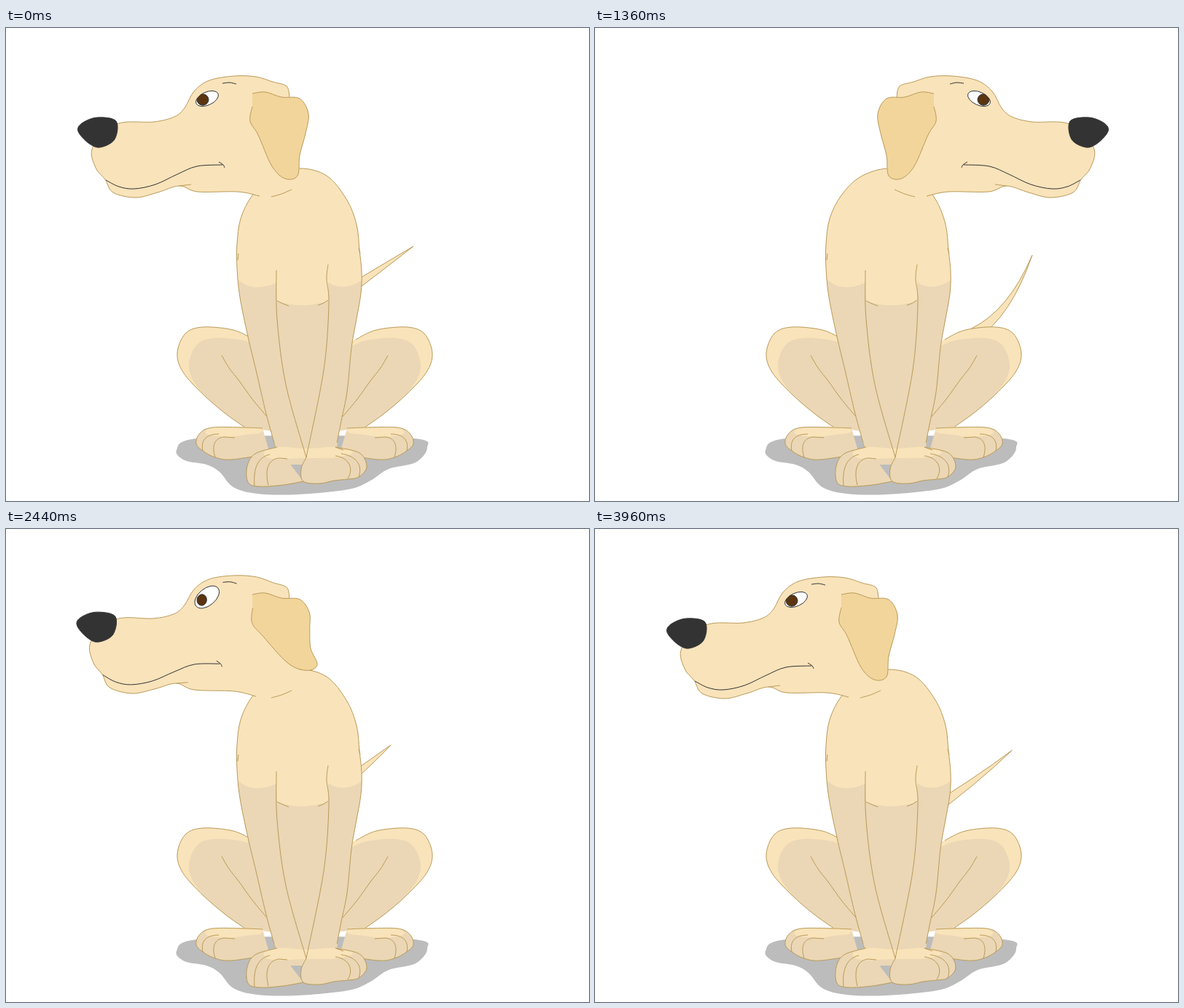
Animation, 800 px wide and 650 px high, one loop 4 s. Source, as an HTML page with a canvas:

```html
<!DOCTYPE html>
<html lang="en">
<head>
<meta charset="utf-8">
<title>Sitting dog</title>
<style>
html, body { margin: 0; width: 100%; height: 100%; overflow: hidden; background: #fff; }
canvas { display: block; }
</style>
</head>
<body>
<canvas id="stage" width="800" height="650"></canvas>
<script>
const ctx = document.getElementById('stage').getContext('2d');
const LIGHT = '#f9e3ba', SHADE = '#ebd7b5', EAR = '#f2d59b', LINE = '#b99a58', INK = '#333', SHADOW = '#bcbcbc';
const LOOP = 4000, STEP = 40, WAG = 800, FLIP = 170;

// Right-facing head: a few points per part, joined by smooth curves.
const awake = {
  head: [414,95, 418,80, 437,74, 460,67, 490,66, 524,72, 545,87, 558,110, 572,122, 600,129, 651,132,
    684,164, 680,192, 667,208, 656,226, 625,233, 595,226, 565,217, 540,225, 485,225, 455,231],
  nape: [400,196],
  nose: [652,128, 678,123, 699,131, 704,142, 690,158, 674,164, 654,153],
  ear: [465,90, 447,88, 425,95, 400,97, 388,118, 392,145, 400,175, 403,203, 420,207, 438,190, 457,147, 468,128, 465,108],
  mouth: [506,188, 541,190, 568,201, 598,215, 627,221, 648,218, 666,209],
  brow: [487,77, 496,75, 506,76],
  neck: [411,222, 425,228, 439,232],
  crease: [549,215, 565,217]
};
const asleep = {
  head: [416,113, 425,100, 428,87, 440,84, 490,83, 522,92, 541,107, 553,128, 562,142, 576,147, 650,155,
    689,180, 695,207, 682,233, 664,252, 635,260, 590,250, 545,238, 515,240, 490,244, 454,247],
  nape: [412,188],
  nose: [637,169, 662,159, 686,162, 687,177, 679,190, 658,191, 638,182],
  ear: [474,115, 448,116, 418,112, 404,123, 400,145, 407,174, 425,202, 452,221, 480,229, 504,221, 503,204, 478,180, 474,140],
  mouth: [506,211, 540,216, 575,231, 620,244, 648,236, 666,219, 683,214],
  brow: [481,113, 492,111, 506,112],
  neck: [410,220, 420,230, 436,238],
  crease: [532,237, 545,239]
};

const mix = (a, b, k) => a + (b - a) * k;
const ramp = (t, from, to) => Math.min(1, Math.max(0, (t - from) / (to - from)));
const wave = (t, peak) => Math.cos((t - peak) / WAG * 2 * Math.PI);

function mapPoints(points, fn) {
  const out = [];
  for (let i = 0; i < points.length; i += 2) out.push(...fn(points[i], points[i + 1]));
  return out;
}
function rotate(x, y, cx, cy, angle) {
  const c = Math.cos(angle), s = Math.sin(angle);
  return [cx + (x - cx) * c - (y - cy) * s, cy + (x - cx) * s + (y - cy) * c];
}

function spline(p, closed = false) {
  const n = p.length / 2;
  const at = i => {
    const j = 2 * (closed ? (i + n) % n : Math.min(n - 1, Math.max(0, i)));
    return [p[j], p[j + 1]];
  };
  const path = new Path2D();
  path.moveTo(p[0], p[1]);
  for (let i = 0; i < (closed ? n : n - 1); i++) {
    const [a, b, c, d] = [at(i - 1), at(i), at(i + 1), at(i + 2)];
    path.bezierCurveTo(b[0] + (c[0] - a[0]) / 6, b[1] + (c[1] - a[1]) / 6,
      c[0] - (d[0] - b[0]) / 6, c[1] - (d[1] - b[1]) / 6, ...c);
  }
  return path;
}
function fill(path, color) {
  ctx.fillStyle = color;
  ctx.fill(path);
}
function line(path, color = LINE) {
  ctx.strokeStyle = color;
  ctx.stroke(path);
}
function ellipse(...args) {
  const path = new Path2D();
  path.ellipse(...args);
  return path;
}
function scoped(draw) {
  ctx.save();
  draw();
  ctx.restore();
}
function mirrored(sum, draw) {
  scoped(() => {
    ctx.transform(-1, 0, 0, 1, sum, 0);
    draw();
  });
}

function drawShadow() {
  fill(spline([234,580, 245,594, 275,600, 293,610, 312,631, 345,640, 400,641, 470,634, 500,622, 525,606,
    562,597, 578,577, 560,564, 410,560, 262,564], true), SHADOW);
}

// The base leads the tip by about a quarter of the wag.
function drawTail(t) {
  const reach = wave(t, 600), bend = wave(t, 535), lead = wave(t, 460);
  const tip = [559 + (reach > 0 ? 43 : 100) * reach, 300 + (reach > 0 ? 13 : 10) * reach];
  const mid = [530 + 40 * bend, 347 + 45 * wave(t, 560)];
  const base = [485 + 50 * lead, 420 + 80 * Math.min(0, lead + .4)];
  const angle = Math.atan2(mid[1] - base[1], mid[0] - base[0]);
  const side = ([x, y], w) => [x - Math.sin(angle) * w, y + Math.cos(angle) * w];
  const path = new Path2D();
  path.moveTo(...side(base, -8));
  path.quadraticCurveTo(...side(mid, -4), ...tip);
  path.quadraticCurveTo(...side(mid, 4), ...side(base, 8));
  fill(path, LIGHT);
  line(path);
}

function drawHindLeg() {
  const thigh = spline([340,428, 312,415, 270,411, 246,420, 235,447, 243,473, 270,503, 300,529, 328,549]);
  const leg = new Path2D(thigh);
  leg.lineTo(375, 555);
  leg.lineTo(375, 440);
  fill(leg, LIGHT);
  scoped(() => {
    ctx.clip(leg);
    ctx.translate(16, 15);
    fill(leg, SHADE);
  });
  line(thigh);

  const foot = spline([352,550, 328,549, 283,549, 266,557, 261,571, 270,581, 287,590, 310,593, 362,585]);
  fill(foot, SHADE);
  fill(spline([285,549, 345,549, 350,556, 328,559, 305,562, 275,558], true), LIGHT);
  line(foot);
  line(new Path2D('M270 581C267 567 274 558 292 558M287 590C282 574 286 563 300 562L314 563'));
  line(spline([296,450, 306,467, 320,485, 338,510, 358,534]));
}

function drawBody() {
  const body = spline([370,577, 357,530, 343,470, 332,424, 321,370, 317,330, 317,297, 322,262, 338,230, 365,204,
    403,193, 440,203, 467,235, 481,270, 485,305, 488,335, 487,365, 480,405, 474,440, 468,500, 460,540, 453,576]);
  fill(body, LIGHT);
  scoped(() => {
    ctx.clip(body);
    fill(new Path2D('M310 335C325 360 350 360 371 350L372 375Q405 387 442 375L442 349C455 360 480 357 495 340V590H310Z'), SHADE);
  });
  line(body);

  const paws = [
    spline([372,576, 342,585, 331,602, 332,624, 347,630, 380,628, 408,623]),
    spline([412,590, 405,606, 408,623, 430,626, 450,622, 469,620, 484,617, 495,603, 485,584, 452,576])
  ];
  fill(new Path2D('M368 570H455L450 600H380Z'), SHADE);
  for (const paw of paws) fill(paw, SHADE);
  fill(spline([354,583, 374,576, 412,578, 452,576, 476,583, 455,590, 412,591, 365,592], true), LIGHT);
  for (const paw of paws) line(paw);
  line(new Path2D('M341 629C339 606 345 590 362 586M360 628C354 604 362 592 375 591L386 592' +
    'M469 619C478 605 470 590 452 588M484 617C490 600 480 588 460 585M452 576L463 580'));

  line(spline([371,333, 372,400, 384,490, 412,590]));
  line(spline([442,325, 440,345, 443,380, 436,470, 412,590]));
  line(new Path2D('M372 375Q380 379 388 382M428 381Q436 379 442 374M319 310L318 319M484 302L486 310'));
}

function drawEye({ lift, shut }, place) {
  const [x, y] = place(mix(527, 513, shut), mix(97, 135, shut));
  const width = mix(16.5, 22, lift), height = mix(9, 14, lift);
  if (shut > .9) {
    line(ellipse(x, y, 13 * place.squeeze, 4, .28, Math.PI, 2 * Math.PI), INK);
    return;
  }
  const eye = ellipse(x, y, width * place.squeeze, height * (1 - shut), mix(.42, .93, lift), 0, 2 * Math.PI);
  fill(eye, '#fff');
  scoped(() => {
    ctx.clip(eye);
    const iris = ellipse(x + mix(6, 8, lift) * place.squeeze, y + mix(1.5, 6, lift),
      mix(8, 5.5, lift), 7.7, -.25 * lift, 0, 2 * Math.PI);
    fill(iris, '#5b3511');
    line(iris, INK);
  });
  line(eye, INK);
}

function drawHead(pose) {
  const { shut, squash, lift } = pose;
  const squeeze = mix(1, .4, squash);
  const squeezeX = x => mix(x, 402 + (x - 555) * .4, squash);
  const place = (x, y) => rotate(squeezeX(x), y, 430, 90, -.066 * lift);
  place.squeeze = squeeze;
  const still = (x, y) => [squeezeX(x), y];
  // The ear bends more towards its tip.
  const swing = (x, y) => rotate(squeezeX(x), y, 450, 95, .52 * lift * ramp(y, 95, 207));
  const part = (name, fn = place) => mapPoints(awake[name].map((v, i) => mix(v, asleep[name][i], shut)), fn);
  const detail = points => spline(mapPoints(points, place));

  if (shut > .5) {
    const farEar = detail([540,107, 551,110, 560,125, 575,147]);
    fill(farEar, EAR);
    line(farEar);
  }
  const outline = spline(part('head'));
  const skull = new Path2D(outline);
  skull.lineTo(...part('nape', still));
  fill(skull, LIGHT);
  line(outline);
  line(spline(part('neck', still)));
  line(spline(part('crease')));
  drawEye(pose, place);
  line(spline(part('brow')), INK);
  line(spline(part('mouth')), INK);
  if (shut > .5) {
    line(detail([683,214, 685,224, 681,233]), INK);
    line(detail([536,111, 537,108, 541,106]), INK);
    line(detail([547,133, 549,129, 554,127]), INK);
  } else {
    line(detail([503,192, 505,188, 511,184]), INK);
  }
  const nose = spline(part('nose'), true);
  fill(nose, INK);
  line(nose, INK);
  const ear = spline(part('ear', swing));
  fill(ear, EAR);
  line(ear);
}

// Dip with closed eyes, sweep across, overshoot at `peak`, then settle.
function turnPose(t, peak) {
  const open = ramp(t, FLIP, peak - 60);
  return {
    shut: ramp(t, 0, 120) * (1 - open),
    squash: ramp(t, 120, FLIP) * (1 - open),
    lift: ramp(t, peak - 130, peak) * (1 - ramp(t, peak + 80, peak + 280))
  };
}

function render(now) {
  const t = Math.floor((now % LOOP) / STEP) * STEP;
  const half = LOOP / 2, turn = t % half, first = t < half;
  ctx.fillStyle = '#fff';
  ctx.fillRect(0, 0, 800, 650);
  drawShadow();
  drawTail(t % WAG);
  drawHindLeg();
  mirrored(820, drawHindLeg);
  drawBody();
  const pose = turnPose(turn, first ? 380 : 500);
  const facingRight = first === (turn >= FLIP);
  if (facingRight) drawHead(pose);
  else mirrored(803, () => drawHead(pose));
}

ctx.lineWidth = 1;
ctx.lineJoin = 'round';
const start = performance.now();
function tick() {
  render(performance.now() - start);
  requestAnimationFrame(tick);
}
tick();
</script>
</body>
</html>
```
